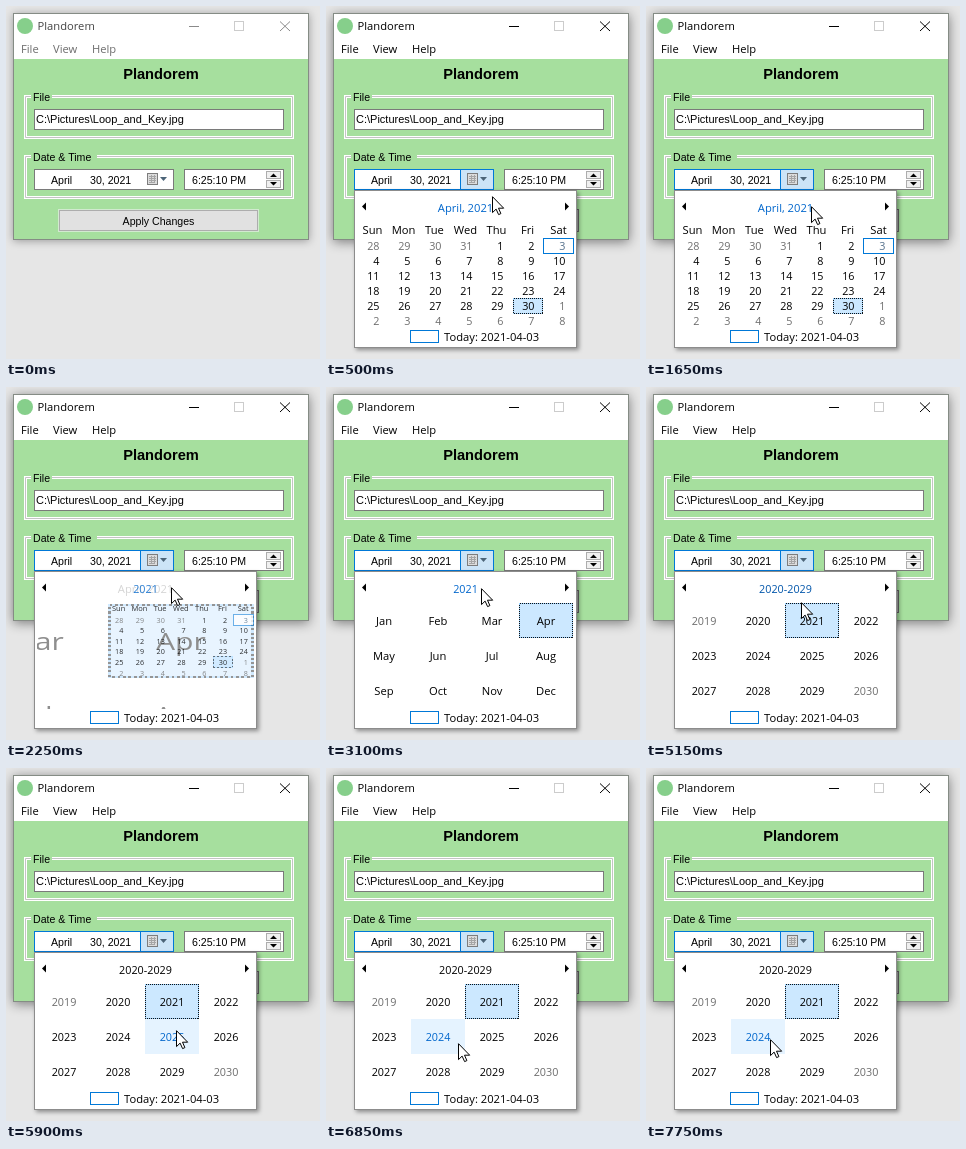
Recreate the animation shown at these times as an HTML page. Size 314x353 px, loop 8 s.

```html
<!DOCTYPE html>
<html lang="en">
<head>
<meta charset="utf-8">
<title>Date picker</title>
<style>
html, body { margin: 0; width: 100%; height: 100%; overflow: hidden; background: #e6e6e6; }
svg { display: block; width: 314px; height: 353px; }
text { font: 11.2px "Open Sans", "Noto Sans", sans-serif; white-space: pre; }
.num { font-size: 10.8px; }
.form { font: 10.6px "Liberation Sans", Arial, sans-serif; }
.path { font: 11px "Liberation Sans", Arial, sans-serif; }
.head { font: bold 14.67px "Liberation Sans", Arial, sans-serif; }
.mid { text-anchor: middle; }
.end { text-anchor: end; }
rect { shape-rendering: crispEdges; }
</style>
</head>
<body>
<svg id="stage" viewBox="0 0 314 353"></svg>
<script>
const LOOP = 8000, STEP = 50;
const BLUE = '#0066cc', GREY = '#6d6d6d', GREEN = '#a6df9e', ACCENT = '#0078d7';
const stage = document.getElementById('stage');

const clamp = v => Math.max(0, Math.min(1, v));
const ramp = (t, from, to) => clamp((t - from) / (to - from));
const lerp = (a, b, p) => a + (b - a) * p;
const hotColor = k => `color-mix(in srgb, ${BLUE} ${k * 100}%, #000)`;

const text = (x, y, s, cls = '', fill = '#000') =>
  `<text x="${x}" y="${y}" class="${cls}" style="fill:${fill}">${s}</text>`;
const box = (x, y, w, h, fill, stroke = 'none', extra = '') =>
  `<rect x="${x}" y="${y}" width="${w}" height="${h}" fill="${fill}" stroke="${stroke}" ${extra}/>`;
const frame = (x, y, w, h, fill, stroke, extra) =>
  box(x + .5, y + .5, w - 1, h - 1, fill, stroke, extra);
const line = (d, color, width = 1) =>
  `<path d="${d}" stroke="${color}" stroke-width="${width}" fill="none"/>`;
const shape = (d, fill = '#000') => `<path d="${d}" fill="${fill}"/>`;
const group = (s, attrs) => `<g ${attrs}>${s}</g>`;

// Pointer path: time, x, y
const path = [
  [500, 166, 190], [650, 166, 192], [750, 166, 192], [1100, 166, 198],
  [1200, 166, 198], [1350, 166, 200], [1600, 166, 200], [1650, 165, 200],
  [2750, 165, 200], [3350, 147, 202], [4900, 147, 202], [5300, 159, 222],
  [5750, 168, 249], [5900, 170, 262], [6200, 170, 273], [6400, 161, 274],
  [6650, 139, 276], [7000, 127, 275], [7450, 125, 273], [7500, 124, 272],
  [7700, 124, 272], [7750, 124, 271], [8000, 124, 271]
];

function pointer(t) {
  const i = path.findIndex((k, n) => n && t <= k[0]);
  const [a, b] = [path[i - 1], path[i]];
  const p = ramp(t, a[0], b[0]);
  const x = Math.round(lerp(a[1], b[1], p)), y = Math.round(lerp(a[2], b[2], p));
  return `<path transform="translate(${x} ${y})" fill="#fff" stroke="#000"
    d="M.5 .7V16.6L4.1 13.1 6.6 18.6 8.9 17.6 6.5 12.2H11.7Z"/>`;
}

function groupBox(y, label, gap) {
  const d = `M25 ${y}H19.5V${y + 41}H286.5V${y}H${gap}`;
  return line(d, '#fff', 3) + line(d, '#c4c4c4') + text(27, y + 4.5, label, 'form');
}

function appWindow(active) {
  const ink = active ? '#000' : '#6d6d6d', btn = active ? '#000' : '#8a8a8a';
  const shadow = active ? '0 2px 6px #0007' : '0 1px 4px #0005';
  return group(frame(7, 7, 296, 227, GREEN, '#858c85'), `style="filter:drop-shadow(${shadow})"`) +
    box(8, 8, 294, 45, '#fff') +
    '<circle cx="19" cy="20" r="8" fill="#86cf8b"/>' +
    text(31.5, 24, 'Plandorem', '', active ? '#000' : '#444') +
    line('M183 20.5H193', btn) + frame(228, 15, 10, 10, 'none', '#ccc') +
    line('M274 15.5L284 25M284 15.5L274 25', btn) +
    text(15, 47, 'File', '', ink) + text(47, 47, 'View', '', ink) + text(86, 47, 'Help', '', ink) +
    text(155, 73, 'Plandorem', 'head mid') +
    groupBox(90.5, 'File', 46) + groupBox(150.5, 'Date &amp; Time', 91) +
    frame(28, 103, 250, 21, '#fff', '#7a7a7a') +
    text(30, 117, 'C:\\Pictures\\Loop_and_Key.jpg', 'path') +
    dateField(active) + timeField() +
    frame(52, 203, 201, 23, '#e1e1e1', active ? '#666' : '#d2ead0') +
    frame(53, 204, 199, 21, '#e1e1e1', '#adadad') +
    text(152.5, 219, 'Apply Changes', 'form mid');
}

function dateField(active) {
  return frame(28, 163, 140, 21, '#fff', active ? ACCENT : '#7a7a7a') +
    (active ? frame(134, 163, 34, 21, '#cce4f7', ACCENT) : '') +
    text(45, 178, 'April', 'form') + text(84, 178, '30, 2021', 'form') +
    frame(141, 167, 11, 12, '#dcdcdc', '#7d7d7d') +
    line('M143 170.5H150M143 172.5H150M143 174.5H150M143 176.5H148M145.5 169V177M148.5 169V177', '#a5a5a5') +
    shape('M154 171H161L157.5 175Z', '#4c6478');
}

function timeField() {
  return frame(178, 163, 100, 21, '#fff', '#7a7a7a') +
    text(186, 178, '6:25:10 PM', 'form') +
    frame(260, 165, 15, 8, '#f0f0f0', '#adadad') + frame(260, 174, 15, 8, '#f0f0f0', '#adadad') +
    shape('M264 171H271L267.5 167.5ZM264 176H271L267.5 179.5Z');
}

const selected = (x, y, w, h) => frame(x, y, w, h, '#cce8ff', '#99d1ff') +
  frame(x, y, w, h, 'none', '#111', 'stroke-dasharray="1 1"');

function days() {
  let s = '';
  ['Sun', 'Mon', 'Tue', 'Wed', 'Thu', 'Fri', 'Sat'].forEach((d, i) => {
    s += text(46.5 + 31 * i, 228, d, 'mid');
  });
  s += frame(217, 232, 31, 16, '#fff', ACCENT) + selected(187, 292, 30, 16);
  for (let i = 0; i < 42; i++) {
    const date = new Date(2021, 2, 28 + i);
    const color = date.getMonth() !== 3 ? GREY : i === 6 ? '#56718c' : '#000';
    s += text(53.5 + 31 * (i % 7), 244 + 15 * Math.floor(i / 7), date.getDate(), 'num end', color);
  }
  return s;
}

const CELL_W = 54, CELL_H = 35;
const cellX = i => Math.floor(31 + 54.25 * (i % 4));
const cellY = i => 216 + CELL_H * Math.floor(i / 4);

// heat(i) gives how far cell i is lit by the pointer, 0 to 1
function grid(labels, cls, pick, heat = () => 0, muted = []) {
  return labels.map((label, i) => {
    const x = cellX(i), y = cellY(i), k = heat(i);
    const back = i === pick ? selected(x, y, CELL_W, CELL_H)
      : k ? box(x, y, CELL_W, CELL_H, '#e5f3ff', 'none', `opacity="${k}"`) : '';
    return back + text(x + 27, y + 22, label, cls, muted.includes(i) ? GREY : hotColor(k));
  }).join('');
}

const monthNames = ['Jan', 'Feb', 'Mar', 'Apr', 'May', 'Jun', 'Jul', 'Aug', 'Sep', 'Oct', 'Nov', 'Dec'];
const yearNames = monthNames.map((_, i) => 2019 + i);
const months = () => grid(monthNames, 'mid', 3);

function years(t) {
  const lit = { 2: [5400, 5750], 6: [5750, 6650], 5: [6650, 9000] };
  const heat = i => lit[i] ? ramp(t, lit[i][0], lit[i][0] + 150) * (1 - ramp(t, lit[i][1], lit[i][1] + 150)) : 0;
  return grid(yearNames, 'num mid', 2, heat, [0, 11]);
}

// Shrinks the inner view into cell i of the outer view, cross-fading
function zoom(inner, outer, i, p) {
  const full = [31, 218, 217, 104], cell = [cellX(i), cellY(i), CELL_W, CELL_H];
  const now = full.map((v, n) => lerp(v, cell[n], p));
  const fit = a => `transform="translate(${now[0]} ${now[1]}) scale(${now[2] / a[2]} ${now[3] / a[3]}) translate(${-a[0]} ${-a[1]})"`;
  return group(group(outer, `${fit(cell)} opacity="${p}"`) +
    group(inner, `${fit(full)} opacity="${1 - p * p}"`), 'clip-path="url(#view)"');
}

const title = (s, color, alpha = 1) =>
  group(text(139.5, 206, s, s.startsWith('2') ? 'num mid' : 'mid', color), `opacity="${alpha}"`);

function change(t, start, inner, outer, i, oldTitle, newTitle) {
  const p = clamp(.06 + .0038 * (t - start)), shown = Math.min(1, 1.9 * p);
  return zoom(inner, outer, i, p) + title(oldTitle, '#000', 1 - shown) + title(newTitle, BLUE, shown);
}

function view(t) {
  if (t < 2150) return days() + title('April, 2021', t < 2000 ? BLUE : '#000');
  if (t < 2400) return change(t, 2150, days(), months(), 3, 'April, 2021', '2021');
  if (t < 4150) return months() + title('2021', t < 4050 ? BLUE : '#000');
  if (t < 4400) return change(t, 4150, months(), years(t), 2, '2021', '2020-2029');
  return years(t) + title('2020-2029', hotColor(1 - ramp(t, 5100, 5400)));
}

function popup(t) {
  return group(frame(28, 184, 223, 158, '#fff', '#8c8c8c'), 'style="filter:drop-shadow(2px 2px 2px #0006)"') +
    shape('M36 200.5L40 196.5V204.5ZM243 200.5L239 196.5V204.5Z') + view(t) +
    frame(84, 324, 29, 13, '#fff', ACCENT) + text(118, 335, 'Today: 2021-04-03');
}

function draw(t) {
  const open = t >= 500;
  stage.innerHTML = '<clipPath id="view"><rect x="31" y="215" width="217" height="107"/></clipPath>' +
    appWindow(open) + (open ? popup(t) + pointer(t) : '');
}

let last = -1;
function tick() {
  const t = Math.floor(performance.now() % LOOP / STEP) * STEP;
  if (t !== last) draw(last = t);
  requestAnimationFrame(tick);
}
tick();
</script>
</body>
</html>
```
